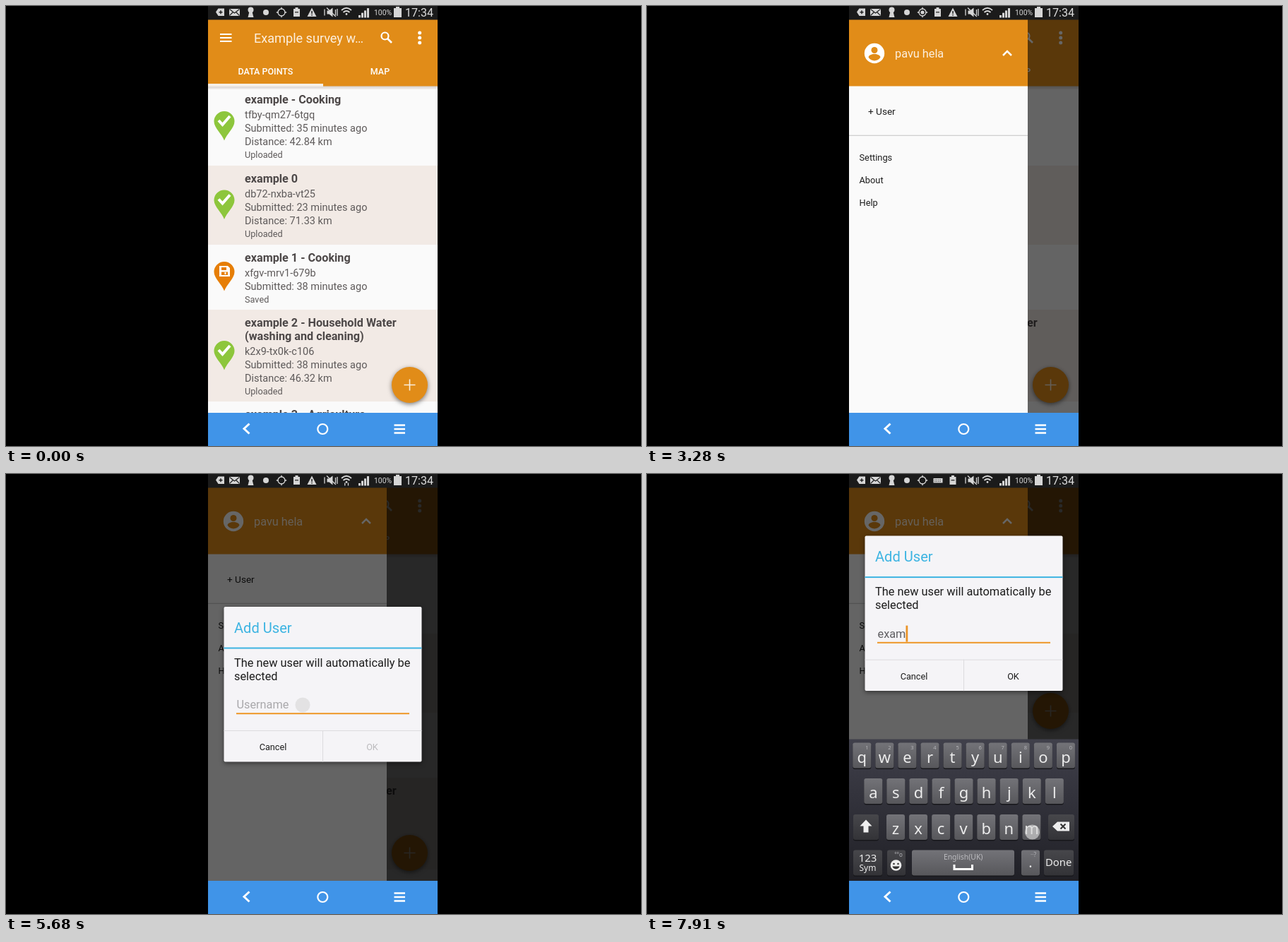
These frames come from a looping animation (899 by 623 pixels, 8000 ms). An HTML page:

```html
<!DOCTYPE html>
<html lang="en">
<head>
<meta charset="utf-8">
<title>Adding a user</title>
<style>
html, body { margin: 0; width: 100%; height: 100%; overflow: hidden; background: #000; }
svg { display: block; width: 100vw; height: 100vh; font-family: Roboto, sans-serif; }
.keys { font-family: "Noto Sans", "Open Sans", sans-serif; fill: #ececec; }
.line { fill: none; stroke: #fff; }
.shade { filter: drop-shadow(0 2px 3px rgba(0,0,0,.5)); }
</style>
</head>
<body>
<svg id="stage" viewBox="0 0 899 623"></svg>
<script>
const ORANGE = '#e18c18';
const STEP = 149.2, LOOP = 8000;

const rect = (x, y, w, h, fill, more = '') =>
  `<rect x="${x}" y="${y}" width="${w}" height="${h}" fill="${fill}" ${more}/>`;
const circle = (x, y, r, fill, more = '') =>
  `<circle cx="${x}" cy="${y}" r="${r}" fill="${fill}" ${more}/>`;
const line = (d, width, more = '') =>
  `<path class="line" d="${d}" stroke-width="${width}" ${more}/>`;
const shape = (d, fill) => `<path d="${d}" fill="${fill}"/>`;
const text = (x, y, size, fill, str, more = '') =>
  `<text x="${x}" y="${y}" font-size="${size}" fill="${fill}" ${more}>${str}</text>`;
const mid = 'text-anchor="middle"';
const bold = 'font-weight="700"';

function pin(y, saved) {
  const mark = saved
    ? shape(`M302 ${y + 6}h12l3 3v12h-15z`, '#fff') +
      rect(305, y + 8, 7, 4, '#e67e06') + rect(305, y + 14.5, 9, 4.5, '#e67e06') + rect(309.5, y + 15, 2, 3, '#fff')
    : line(`M301 ${y + 13}l5.5 6 10.5-12`, 4);
  return shape(`M309 ${y + 41.5}c-3-9-14.5-18-14.5-27a14.5 14.5 0 0 1 29 0c0 9-11.5 18-14.5 27z`,
    saved ? '#e67e06' : '#8dc63c') + mark;
}

function row(top, height, fill, titles, details, status, pinTop) {
  let y = top + 24.3;
  let out = rect(286, top, 325, height, fill);
  titles.forEach((t, i) => { out += text(338, y + i * 19, 16.2, '#4d4848', t, bold); });
  y += (titles.length - 1) * 19 + 20.2;
  details.forEach((t, i) => { out += text(338, y + i * 19.4, 14.5, '#5e5a5a', t); });
  y += (details.length - 1) * 19.4 + 17.6;
  return out + text(338, y, 12.7, '#5e5a5a', status) + (pinTop ? pin(pinTop, status === 'Saved') : '');
}

const list =
  row(114, 112, '#fafafa', ['example - Cooking'],
    ['tfby-qm27-6tgq', 'Submitted: 35 minutes ago', 'Distance: 42.84 km'], 'Uploaded', 149) +
  row(226, 112, '#f2eae5', ['example 0'],
    ['db72-nxba-vt25', 'Submitted: 23 minutes ago', 'Distance: 71.33 km'], 'Uploaded', 260.5) +
  row(338, 92, '#fafafa', ['example 1 - Cooking'],
    ['xfgv-mrv1-679b', 'Submitted: 38 minutes ago'], 'Saved', 362) +
  row(430, 130, '#f2eae5', ['example 2 - Household Water', '(washing and cleaning)'],
    ['k2x9-tx0k-c106', 'Submitted: 38 minutes ago', 'Distance: 46.32 km'], 'Uploaded', 474) +
  row(560, 63, '#fafafa', ['example 3 - Agriculture'], [], '');

const toolbar =
  rect(286, 113, 325, 5, 'url(#edge)') +
  rect(286, 19, 325, 94.5, ORANGE) +
  line('M303 40h16.5M303 45h16.5M303 50h16.5', 2) +
  text(351, 52, 18.1, '#fdf0df', 'Example survey w…') +
  circle(536.5, 42.5, 5, 'none', 'stroke="#fff" stroke-width="2.2"') +
  line('M540 46l6 6', 2.6) +
  [38, 45, 52].map(y => circle(585.7, y, 2.5, '#fff')).join('') +
  text(367.5, 97, 12.5, '#fff', 'DATA POINTS', mid + ' font-weight="500"') +
  text(529.5, 97, 12.5, '#fff', 'MAP', mid + ' font-weight="500"') +
  rect(286, 110, 163, 4, '#f6efe6');

const fab = `<g id="fab"><g class="shade">${circle(571.5, 536.5, 25.5, ORANGE)}</g>` +
  line('M563.5 536.5h16M571.5 528.5v16', 1.6, 'opacity=".85"') + '</g>';

const item = (x, y, size, str, fill = '#1d1d1d') => text(x, y, size, fill, str);

const drawer = `<g id="drawer">` +
  rect(286, 19, 253, 557, '#fafafa') + rect(286, 19, 253, 94.5, ORANGE) +
  circle(322, 67, 14.2, '#fff') + circle(322, 62.5, 4.5, ORANGE) +
  shape('M313.5 72.5c1-6 16-6 17 0c-4 6.500-13 6.500-17 0z', ORANGE) +
  text(351, 73, 16.3, '#fdf0df', 'pavu hela') +
  `<path id="caret" class="line" stroke-width="2.5"/>` +
  `<g id="surveys">` +
    item(300.5, 142, 12.8, 'Surveys', '#9b9b9b') +
    item(313.5, 171, 13.6, 'Example survey with Pebblefin', '#e29424') +
    item(313.5, 187, 13.6, 'tests', '#e29424') +
    item(313.5, 227, 13.6, '_Example all questions with') +
    item(313.5, 243, 13.6, 'translation') + '</g>' +
  `<g id="users">${item(313, 153.5, 13.6, '+ User')}</g>` +
  `<g id="links">` + rect(286, 271.700, 253, 1.3, '#cfcfcf') +
    item(300.5, 308, 12.8, 'Settings') + item(300.5, 340, 12.8, 'About') +
    item(300.5, 371.5, 12.8, 'Help') + '</g></g>';

const dialog = `<g id="dialog">` +
  rect(308.5, 188, 280, 219.5, '#f5f4f7', 'rx="2" class="shade"') +
  text(323, 224.5, 20.1, '#3db4e2', 'Add User') +
  rect(308.5, 245.5, 280, 2, '#3db4e2') +
  text(323, 272.7, 16.35, '#1c1c1c', 'The new user will automatically be') +
  text(323, 291.5, 16.35, '#1c1c1c', 'selected') +
  `<text id="field" x="326.5" y="332.300" font-size="16.3"></text>` +
  rect(326, 338.2, 245, 2, '#ee9727') +
  rect(0, 315, 2.8, 23, '#ea9428', 'id="cursor"') +
  rect(308.5, 363, 280, 1, '#dcdbde') + rect(448, 363, 1, 44.5, '#dcdbde') +
  text(378, 391, 12.7, '#1c1c1c', 'Cancel', mid) +
  text(518.5, 391, 12.7, '#bcbbbe', 'OK', mid + ' id="ok"') + '</g>';

const key = (x, y, w, dark) =>
  rect(x, y + 1.5, w, 36, '#17171b', 'rx="3"') + rect(x, y, w, 36, dark ? 'url(#darkKey)' : 'url(#key)', 'rx="3"');
const PITCH = 32.07;

function keyRow(letters, x, y, hints) {
  return [...letters].map((c, i) => {
    const cx = x + i * PITCH;
    return key(cx - 13, y, 26) + text(cx, y + 28, 22, '#ececec', c, mid) +
      (hints ? text(cx + 7, y + 9.5, 7.5, '#b4b4b8', (i + 1) % 10, mid) : '');
  }).join('');
}

const keyboard = `<g id="keyboard" class="keys">` +
  rect(286, 375.5, 325, 201, 'url(#board)') +
  keyRow('qwertyuiop', 304.3, 380.5, true) +
  keyRow('asdfghjkl', 320.3, 431) +
  keyRow('zxcvbnm', 352, 482) +
  key(292, 482, 36, true) + shape('M310 489.500l8.500 9h-5v9h-7v-9h-5z', '#eee') +
  key(568, 482, 37, true) + shape('M574 499l7-6.500h17v13h-17z', '#eee') +
  `<path d="M585.500 495.500l7 7m0-7l-7 7" stroke="#333" stroke-width="2"/>` +
  key(292, 532.5, 41, true) + text(312.5, 549, 15, '#ececec', '123', mid) + text(312.5, 562, 12, '#ececec', 'Sym', mid) +
  key(340, 532.5, 26, true) + circle(352.5, 554, 7.8, '#eee') +
  circle(349.500, 552, 1.3, '#333') + circle(355.500, 552, 1.3, '#333') + shape('M347.500 555.500h10c-1 5-9 5-10 0z', '#333') +
  text(356, 542, 8, '#b4b4b8', '°°o', mid) +
  key(375, 532.5, 145) + text(447.7, 545.7, 10.4, '#bcbcc0', 'English(UK)', mid) +
  line('M435 553v6.500h25.500v-6.500', 3) +
  key(530, 532.5, 26) + text(543, 556.5, 20, '#ececec', '.', mid) + text(547, 542, 8, '#b4b4b8', '··?', mid) +
  key(562, 532.5, 42, true) + text(582.7, 555, 14.8, '#ececec', 'Done', mid) + '</g>';

const GREY = '#d6d6d6';
const cell = x => shape(`M${x - 4.500} 4h2.500v-2h4v2h2.500v11h-9z`, GREY) + rect(x - 2.5, 8, 5, 1.5, '#444');
const grey = `stroke="${GREY}" style="stroke:${GREY}"`;
const status = rect(286, 0, 325, 19.5, '#1b1b1b') +
  shape('M297 8.500l3.500-5h8.500v10.500h-8.500z', GREY) + line('M301.500 8.700h5M304 6.200v5', 1.5, 'style="stroke:#222"') +
  rect(316, 4, 15, 10, GREY) + line('M316.500 4.500l7 5.500 7-5.500M316.500 13.500l5-5M330.500 13.500l-5-5', 1.2, 'style="stroke:#222"') +
  circle(346.5, 5.5, 4, GREY) + shape('M344.500 8h4l2 8h-8z', GREY) +
  circle(368, 9, 4, GREY) +
  circle(390, 9, 5, 'none', `stroke="${GREY}" stroke-width="1.3"`) +
  line('M390 1.800v3M390 13.200v3M382.800 9h3M394.200 9h3', 1.3, grey) +
  circle(390, 9, 2.6, GREY, 'id="gps"') +
  `<g id="plain">${cell(411.5)}${shape('M433 2.500l6.500 12.500h-13z', GREY)}` + rect(432.3, 7, 1.5, 4, '#222') + rect(432.3, 12, 1.5, 1.5, '#222') + '</g>' +
  `<g id="typing">${rect(405.5, 6, 13, 6.5, GREY)}` + line('M407 8.200h10M407 10.500h10', 1, 'style="stroke:#555" stroke-dasharray="1.500 1"') + cell(433) + '</g>' +
  shape('M454.500 6.500h3l5-4v13l-5-4h-3z', GREY) +
  line('M451 4.500v9M466.500 5v8M469 4v10M454 2.500l13 12.500', 1.3, grey) +
  line('M475 6q7-6.500 14 0M477.500 9q4.500-4 9 0', 1.8, grey) + circle(482, 11.5, 1.4, GREY) +
  line('M479.800 12.500v4M484.500 12.500v4', 1.3, grey + ' id="traffic"') +
  [0, 1, 2, 3].map(i => rect(499 + i * 4, 13 - i * 3.3, 3, 3.5 + i * 3.3, GREY)).join('') +
  text(521, 13, 10.4, GREY, '100%') +
  shape('M549 3h3v-2h5v2h3v13h-11z', GREY) +
  text(565, 14.5, 16.1, '#dedede', '17:34');

const nav = rect(286, 576, 325, 47, '#4094e8') +
  line('M344.500 591.500l-7.500 7 7.500 7', 3) +
  circle(448.3, 599, 7, 'none', 'stroke="#fff" stroke-width="2.200"') +
  line('M549.500 593.500h15.500M549.500 599h15.500M549.500 604.500h15.500', 2.5);

const gradient = (id, from, to) =>
  `<linearGradient id="${id}" x2="0" y2="1"><stop stop-color="${from}"/><stop offset="1" stop-color="${to}"/></linearGradient>`;

document.getElementById('stage').innerHTML =
  `<defs>${gradient('edge', '#d3cdca', '#f3efed')}${gradient('key', '#737378', '#57575b')}` +
  `${gradient('darkKey', '#47474b', '#333337')}${gradient('board', '#40404b', '#202026')}` +
  `<clipPath id="phone"><rect x="286" width="325" height="623"/></clipPath></defs>` +
  `<g clip-path="url(#phone)">${list}${toolbar}${fab}` +
  rect(286, 19, 325, 557, '#000', 'id="scrim"') + drawer +
  rect(286, 19, 325, 557, '#000', 'id="dim"') + keyboard + dialog +
  circle(0, 0, 10.5, '#d8d8d8', 'id="touch" fill-opacity=".65"') + status + nav + '</g>';

const el = id => document.getElementById(id);
const show = (id, on) => el(id).setAttribute('display', on ? 'inline' : 'none');
const move = (id, x, y) => el(id).setAttribute('transform', `translate(${x} ${y})`);
const within = (k, from, to) => k >= from && k < to;

const gpsFlips = [3, 6, 9, 12, 16, 19, 22, 26, 29, 32, 35, 38, 41, 44, 47, 50];
const letterSteps = [43, 46, 50, 53];
const touches = [ // from, to, x, y
  [6, 8, 311, 46], [16, 18, 510, 67], [26, 28, 334, 150], [37, 39, 420, 327],
  [42, 44, 369, 404], [45, 47, 384, 504], [49, 50, 306, 457], [52, 53, 545.5, 512], [53, 54, 545.5, 507]
];

function draw(time) {
  const k = Math.floor((time % LOOP + 12) / STEP);

  const u = Math.min(1, Math.max(0, (k * STEP - 1073) / 512));
  const open = 1 - (1 - u) ** 5;
  move('drawer', -253 * (1 - open), 0);
  show('drawer', open > 0);
  el('scrim').setAttribute('opacity', 0.6 * open);

  const users = k >= 18;
  show('surveys', !users);
  show('users', users);
  move('links', 0, users ? -89 : 0);
  el('caret').setAttribute('d', users ? 'M504 70l6-6 6 6' : 'M504 64l6 6 6-6');

  show('dialog', k >= 28);
  el('dim').setAttribute('opacity', k < 28 ? 0 : k < 29 ? 0.4 : 0.6);

  const raised = k < 39 ? 0 : k < 40 ? 0.7 : 1;
  show('keyboard', raised > 0);
  move('keyboard', 0, 201 * (1 - raised));
  move('dialog', 0, -100.4 * raised);
  move('fab', 0, raised ? -201 : 0);
  show('plain', !raised);
  show('typing', raised);

  const typed = 'exam'.slice(0, letterSteps.filter(s => s <= k).length);
  const field = el('field');
  field.textContent = typed || 'Username';
  field.setAttribute('fill', typed ? '#5f5e61' : '#a9a8ab');
  el('ok').setAttribute('fill', typed ? '#1c1c1c' : '#bcbbbe');
  el('cursor').setAttribute('x', 326.6 + (typed ? field.getComputedTextLength() : 0));
  show('cursor', within(k, 28, 31) || within(k, 34, 38) || k >= 41);

  show('gps', gpsFlips.filter(s => s <= k).length % 2);
  show('traffic', within(k, 27, 52));

  const touch = touches.find(([from, to]) => within(k, from, to));
  show('touch', touch);
  if (touch) move('touch', touch[2], touch[3]);
}

const start = performance.now();
function tick() {
  draw(performance.now() - start);
  requestAnimationFrame(tick);
}
tick();
</script>
</body>
</html>
```
